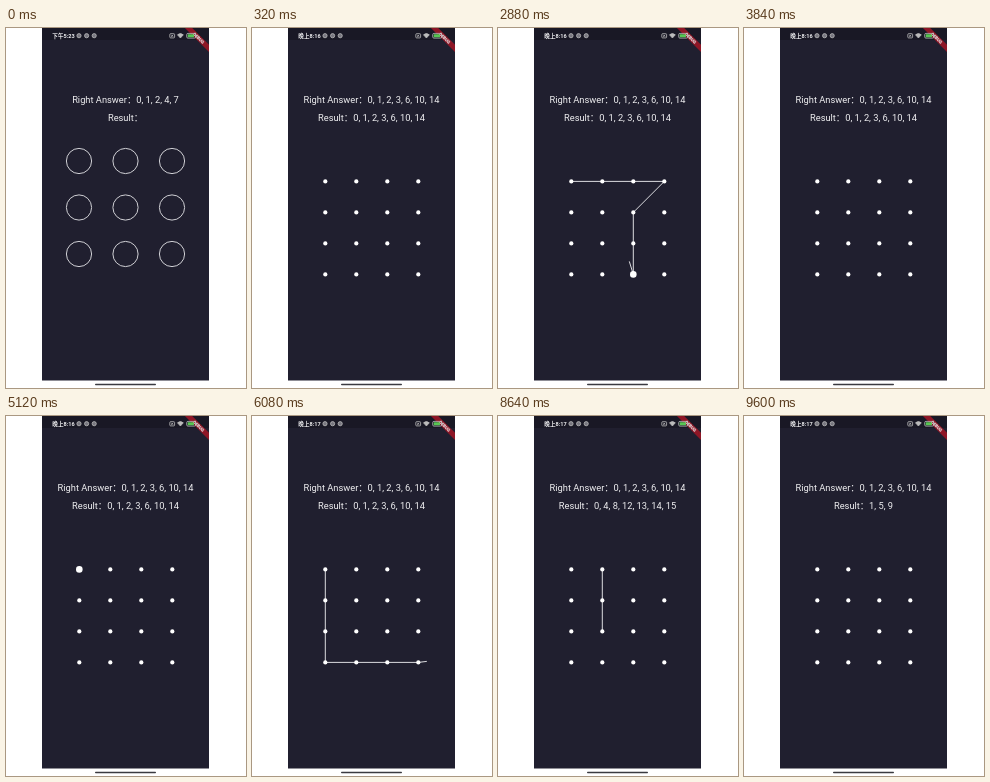
Recreate the animation shown at these times as an HTML page. Size 240 by 360 pixels, loop 9.92 s.

```html
<!DOCTYPE html>
<html lang="zh-CN">
<head>
<meta charset="utf-8">
<title>Pattern lock</title>
<style>
  html, body { margin: 0; width: 100%; height: 100%; overflow: hidden; background: #fff; }
  svg { display: block; width: 100%; height: 100%; }
  text { font-family: Roboto, "Noto Sans CJK SC", "Noto Sans CJK", sans-serif; fill: #f0f0f2; }
  .label { font-size: 9.3px; text-anchor: middle; }
  .clock { font-size: 5.6px; font-weight: 700; }
  .icon { fill: none; stroke: #bbb; stroke-width: .8; }
  .badge { fill: #77767f; stroke: #bbb; stroke-width: .8; }
  .ring { fill: none; stroke: #cfcfd4; stroke-width: 1; }
  .dot { fill: #fff; }
  #trace { fill: none; stroke: #dcdce0; stroke-width: 1; }
</style>
</head>
<body>
<svg viewBox="0 0 240 360">
  <defs><clipPath id="screen"><rect x="36" width="167" height="352.5"/></clipPath></defs>
  <g clip-path="url(#screen)">
    <rect x="36" width="167" height="353" fill="#201f2f"/>
    <rect x="36" width="167" height="12" fill="#191825"/>
    <g transform="translate(203 0) rotate(45)">
      <rect x="-17" y="11.9" width="34" height="5.1" fill="#8e1626"/>
      <text y="16" font-size="4.3" font-weight="900" text-anchor="middle">DEBUG</text>
    </g>
  </g>
  <text class="clock" id="clock" x="46.3" y="9.6"></text>
  <g id="badges"></g>
  <g class="icon">
    <rect x="163.8" y="5.7" width="4.8" height="4.2" rx=".8"/>
    <path d="M165.2 6.8l2 2m0-2l-2 2"/>
    <path d="M171.5 6.8q2.900-2.400 5.800 0L174.400 10z" fill="#bbb"/>
    <rect x="180.7" y="5.4" width="9" height="4.7" rx="1.2"/>
    <path d="M190.8 6.9v1.7"/>
  </g>
  <rect x="181.7" y="6.3" width="6.3" height="2.9" rx=".5" fill="#58c654"/>
  <text class="label" id="answer" x="119.5" y="74.8"></text>
  <text class="label" id="result" x="119.5" y="92.7"></text>
  <g id="rings"></g>
  <g id="grid" transform="translate(.3 .4)"><path id="trace"/></g>
  <rect x="89" y="355.8" width="61" height="1.4" rx=".7" fill="#3a3a40"/>
</svg>
<script>
const TICK = 320, TICKS = 31;
const REACH = 14;     // px from a node's centre that selects it
const PULSE = 0.28;   // ticks a new node stays enlarged
const $ = id => document.getElementById(id);

// Finger waypoints are [tick, x, y].
const gestures = [
  { lift: 11, clear: 12, finger: [[3.6, 73, 153], [4, 88, 155], [5, 158, 153.6], [6, 144, 178],
    [7, 135, 184], [8, 135, 213], [9, 131, 233], [10, 133, 251]] },
  { lift: 20, clear: 22, finger: [[16, 73, 153], [17, 73, 200], [17.46, 73, 246],
    [18, 127, 246], [19, 174.5, 245]] },
  { lift: 28, clear: 30, finger: [[25, 104, 153], [26, 103.5, 174], [27, 104, 215]] }
];

function lattice(columns, x, y, gap) {
  return Array.from({ length: columns ** 2 }, (_, i) =>
    [x + gap * (i % columns), y + gap * Math.floor(i / columns)]);
}
const nodes = lattice(4, 73, 153, 31);

function addCircle(parent, className, [cx, cy], r) {
  const circle = document.createElementNS("http://www.w3.org/2000/svg", "circle");
  for (const [key, value] of Object.entries({ class: className, cx, cy, r })) {
    circle.setAttribute(key, value);
  }
  return $(parent).appendChild(circle);
}

for (let i = 0; i < 3; i++) addCircle("badges", "badge", [73 + 7.6 * i, 7.7], 2.1);
lattice(3, 73, 133, 46.5).forEach(center => addCircle("rings", "ring", center, 12.6));
const dots = nodes.map(center => addCircle("grid", "dot", center, 2.1));

function fingerAt(finger, tick) {
  const next = finger.findIndex(point => point[0] > tick);
  if (next < 0) return finger.at(-1).slice(1);
  const [t0, x0, y0] = finger[next - 1], [t1, x1, y1] = finger[next];
  const p = (tick - t0) / (t1 - t0);
  return [x0 + (x1 - x0) * p, y0 + (y1 - y0) * p];
}

// Follows the finger up to a tick and collects the nodes it came near.
function follow({ finger }, tick) {
  const path = [];
  let lastHit = 0, position;
  for (let t = finger[0][0]; t <= tick + 1e-6; t += 0.02) {
    position = fingerAt(finger, t);
    const hit = nodes.findIndex(([x, y], i) =>
      !path.includes(i) && Math.hypot(x - position[0], y - position[1]) < REACH);
    if (hit >= 0) {
      path.push(hit);
      lastHit = t;
    }
  }
  return { path, position: fingerAt(finger, tick), big: tick - lastHit < PULSE ? path.at(-1) : -1 };
}

function render(tick) {
  const opening = tick < 1;
  $("rings").style.display = opening ? "" : "none";
  $("grid").style.display = opening ? "none" : "";

  const answer = opening ? "0, 1, 2, 4, 7" : "0, 1, 2, 3, 6, 10, 14";
  const done = gestures.findLast(gesture => tick >= gesture.lift);
  const result = done ? follow(done, done.lift).path.join(", ") : opening ? "" : answer;
  $("clock").textContent = opening ? "下午5:23" : tick < 18 ? "晚上8:16" : "晚上8:17";
  $("answer").textContent = "Right Answer：" + answer;
  $("result").textContent = "Result：" + result;

  const active = gestures.find(({ finger, clear }) => tick >= finger[0][0] && tick < clear);
  const { path, position, big } = active ? follow(active, tick) : { path: [], big: -1 };
  const points = path.map(i => nodes[i]);
  if (active && tick < active.lift) points.push(position);
  $("trace").setAttribute("d", points.length > 1 ? "M" + points.join("L") : "");
  dots.forEach((dot, i) => dot.setAttribute("r", i === big ? 3.3 : 2.1));
}

const start = performance.now();
function frame() {
  // The picture holds still within each tick.
  render(Math.floor((performance.now() - start) / TICK) % TICKS);
  requestAnimationFrame(frame);
}
frame();
</script>
</body>
</html>
```
